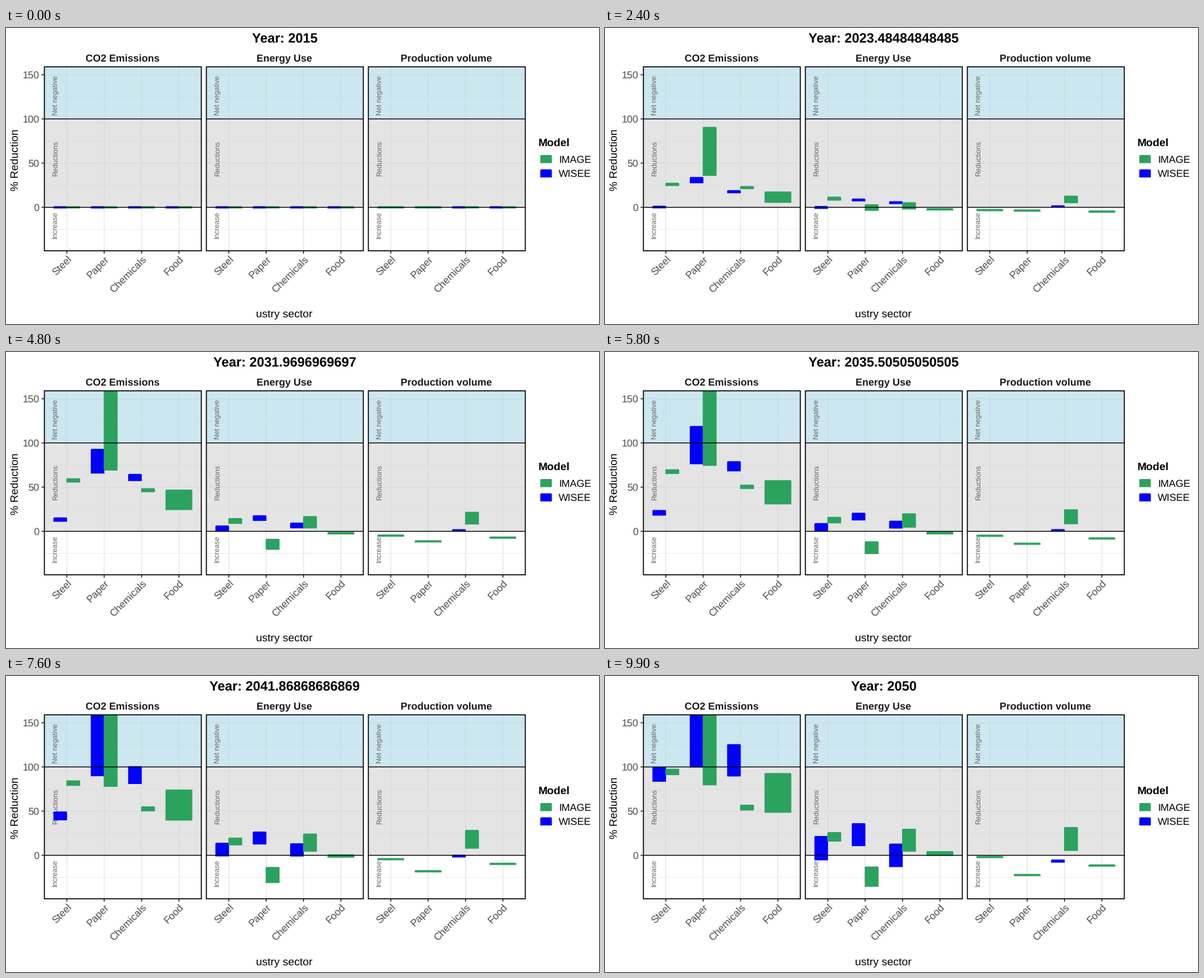
Write a matplotlib script that moves like this. It is 1058x529 px and loops after 10000 ms.

```python
import numpy as np
import matplotlib.pyplot as plt
from matplotlib.animation import FuncAnimation
from matplotlib.patches import Polygon, Rectangle

plt.rcParams["font.family"] = "Liberation Sans"
plt.rcParams["path.snap"] = False
plt.rcParams["text.hinting"] = "none"

W, H, DPI = 1058, 529, 100
FRAMES, INTERVAL = 100, 100
GREEN, BLUE = "#2CA25F", "#0000FF"
PANELS = ["CO2 Emissions", "Energy Use", "Production volume"]
SECTORS = ["Steel", "Paper", "Chemicals", "Food"]
LEFT, STEP, WIDTH = 68.5, 289, 280
TOP, BOTTOM = 69.4, 398.2
UNIT = WIDTH / 4.2
HALF = 23.9

YEARS = np.linspace(2015, 2050, FRAMES)
KEY_YEARS = np.array([2015, 2020, 2035, 2050])


def ypix(v):
    return 320.5 - 1.58 * v


def xpix(panel, sector):
    return LEFT + STEP * panel + UNIT * (0.6 + sector)


def ease_through(points):
    """Monotone cubic from zero through the values at the key years."""
    v = np.array([0, *points], float)
    h = np.diff(KEY_YEARS)
    d = np.diff(v) / h
    both = d[:-1] * d[1:]
    total = np.where(both > 0, d[:-1] + d[1:], 1)
    end = (3 * d[-1] - d[-2]) / 2
    end = end if end * d[-1] > 0 else 0
    m = np.r_[d[0], np.where(both > 0, 2 * both / total, 0), end]
    k = np.clip(np.searchsorted(KEY_YEARS, YEARS, "right") - 1, 0, len(h) - 1)
    t = (YEARS - KEY_YEARS[k]) / h[k]
    s = t * t * (3 - 2 * t)
    return (v[k] + s * (v[k + 1] - v[k])
            + h[k] * t * (1 - t) * ((1 - t) * m[k] - t * m[k + 1]))


def box(l, r, t, b):
    """Bar outline with rounded upper corners."""
    return [(l, b), (l, t + 1.6), (l + 0.5, t + 0.5), (l + 1.6, t),
            (r - 1.6, t), (r - 0.5, t + 0.5), (r, t + 1.6), (r, b)]


fig = plt.figure(figsize=(W / DPI, H / DPI), dpi=DPI, facecolor="white")
ax = fig.add_axes([0, 0, 1, 1])
ax.set_xlim(0, W)
ax.set_ylim(H, 0)
ax.axis("off")


def line(x0, y0, x1, y1, color, px, z):
    ax.plot([x0, x1], [y0, y1], color=color, lw=px * 72 / DPI, zorder=z,
            solid_capstyle="butt")


def text(x, y, s, size, color="black", ha="center", **kw):
    return ax.text(x, y, s, fontsize=size, color=color, ha=ha, va="baseline",
                   zorder=3, rotation_mode="anchor", **kw)


def rect(x, y, w, h, z, **kw):
    patch = Rectangle((x, y), w, h, zorder=z, **kw)
    ax.add_patch(patch)
    return patch


def draw_panel(p):
    x0 = LEFT + STEP * p
    x1 = x0 + WIDTH
    for v in range(-25, 151, 25):
        line(x0, ypix(v), x1, ypix(v), "#EBEBEB", 0.95 if v % 50 else 1.9, 1)
    for s, name in enumerate(SECTORS):
        x = xpix(p, s)
        line(x, TOP, x, BOTTOM, "#EBEBEB", 1.9, 1)
        line(x, BOTTOM, x, BOTTOM + 5, "#333333", 1.9, 7)
        text(x + 9.2, 414.3, name, 13, "#4D4D4D", "right", rotation=45)
    rect(x0, TOP, WIDTH, ypix(100) - TOP, 2, fc="lightblue", alpha=0.6, lw=0)
    rect(x0, ypix(100), WIDTH, ypix(0) - ypix(100), 2, fc="lightgrey", alpha=0.6, lw=0)
    for y, s in ((120.2, "Net negative"), (232.7, "Reductions"), (351.7, "Increase")):
        text(x0 + 23.5, y, s, 9.1, "#666666", rotation=90)
    for v in (0, 100):
        line(x0, ypix(v), x1, ypix(v), "black", 1.5, 6)
    rect(x0, TOP, WIDTH, BOTTOM - TOP, 7, fc="none", ec="black", lw=1.8 * 72 / DPI)
    text(x0 + WIDTH / 2 - 0.8, 60, PANELS[p], 13, "#1A1A1A", weight="bold")
    return rect(x0, TOP, WIDTH, BOTTOM - TOP, 0, fc="none", lw=0)


class Bar:
    """Lower edge eases through key values; the range above it widens as a power of time."""

    def __init__(self, panel, sector, model, low, spread=0, power=None, side=True):
        self.blue = model == "WISEE"
        self.side = side
        self.sector = SECTORS.index(sector)
        self.x = xpix(panel, self.sector)
        power = power or (2.5 if self.blue else 1)
        self.low = ease_through(low)
        self.high = self.low + spread * np.linspace(0, 1, FRAMES) ** power
        self.patch = Polygon([(0, 0)] * 3, fc=BLUE if self.blue else GREEN,
                             lw=0, zorder=4 if self.blue else 5)
        ax.add_patch(self.patch)
        self.patch.set_clip_path(frames[panel])

    def place(self, i):
        # WISEE has a value for food in the first year only
        food = self.sector == 3
        self.patch.set_visible(not (food and self.blue and i > 0))
        wide = not self.side or (food and i > 0)
        l = self.x - (HALF if self.blue or wide else 0.8)
        r = self.x + (0.4 if self.blue else HALF)
        self.patch.set_xy(box(l, r, ypix(self.high[i]) - 2, ypix(self.low[i]) + 2))


frames = [draw_panel(p) for p in range(3)]
bars = [
    Bar(0, "Steel", "WISEE", (-1.3, 18, 84.5), 14.5),
    Bar(0, "Steel", "IMAGE", (13.6, 65, 92), 4.7),
    Bar(0, "Paper", "WISEE", (14.6, 76, 100.6), 155),
    Bar(0, "Paper", "IMAGE", (22, 75, 80.5), 900, power=2),
    Bar(0, "Chemicals", "WISEE", (6.2, 68, 90.5), 34),
    Bar(0, "Chemicals", "IMAGE", (12, 49, 52), 4),
    Bar(0, "Food", "IMAGE", (2, 31, 49.4), 42.4),
    Bar(1, "Steel", "WISEE", (-0.8, 1.5, -4.4), 25),
    Bar(1, "Steel", "IMAGE", (8.2, 10.2, 16.8), 8.2),
    Bar(1, "Paper", "WISEE", (5.4, 13.6, 11.7), 23.4),
    Bar(1, "Paper", "IMAGE", (0, -24, -34.3), 20.4),
    Bar(1, "Chemicals", "WISEE", (5, 4.5, -12), 24),
    Bar(1, "Chemicals", "IMAGE", (-2.2, 5.4, 5.4), 23.4),
    Bar(1, "Food", "IMAGE", (-2.3, -2.2, 0.6), 2.9, power=3),
    Bar(2, "Steel", "IMAGE", (-2.2, -5, -1.9), side=False),
    Bar(2, "Paper", "IMAGE", (-1.5, -13.7, -22.3), side=False),
    Bar(2, "Chemicals", "WISEE", (1, 1, -7), 1),
    Bar(2, "Chemicals", "IMAGE", (4.4, 9.3, 6.3), 24.4),
    Bar(2, "Food", "IMAGE", (-3.5, -7.9, -11.5)),
] + [Bar(p, "Food", "WISEE", (0, 0, 0)) for p in range(3)]

for v in range(0, 151, 50):
    line(LEFT - 5, ypix(v), LEFT, ypix(v), "#333333", 1.9, 7)
    text(59.7, ypix(v) + 6.4, str(v), 13, "#4D4D4D", "right")
text(22, 235.8, "% Reduction", 14, rotation=90)
text(496.5, 517.5, "ustry sector", 14)

text(949.8, 210.6, "Model", 14, ha="left", weight="bold")
for y, color, name in ((227, GREEN, "IMAGE"), (252.6, BLUE, "WISEE")):
    ax.add_patch(Polygon(box(953.3, 973.8, y, y + 14.5), fc=color, lw=0, zorder=3))
    text(986, y + 13.6, name, 13, ha="left")

title = text(497.3, 26.4, "", 17, weight="bold")


def update(i):
    title.set_text(f"Year: {YEARS[i]:.15g}")
    for bar in bars:
        bar.place(i)
    return [title] + [bar.patch for bar in bars]


anim = FuncAnimation(fig, update, frames=FRAMES, init_func=lambda: update(0),
                     interval=INTERVAL, repeat=True, repeat_delay=0, blit=False)
plt.show()
```
